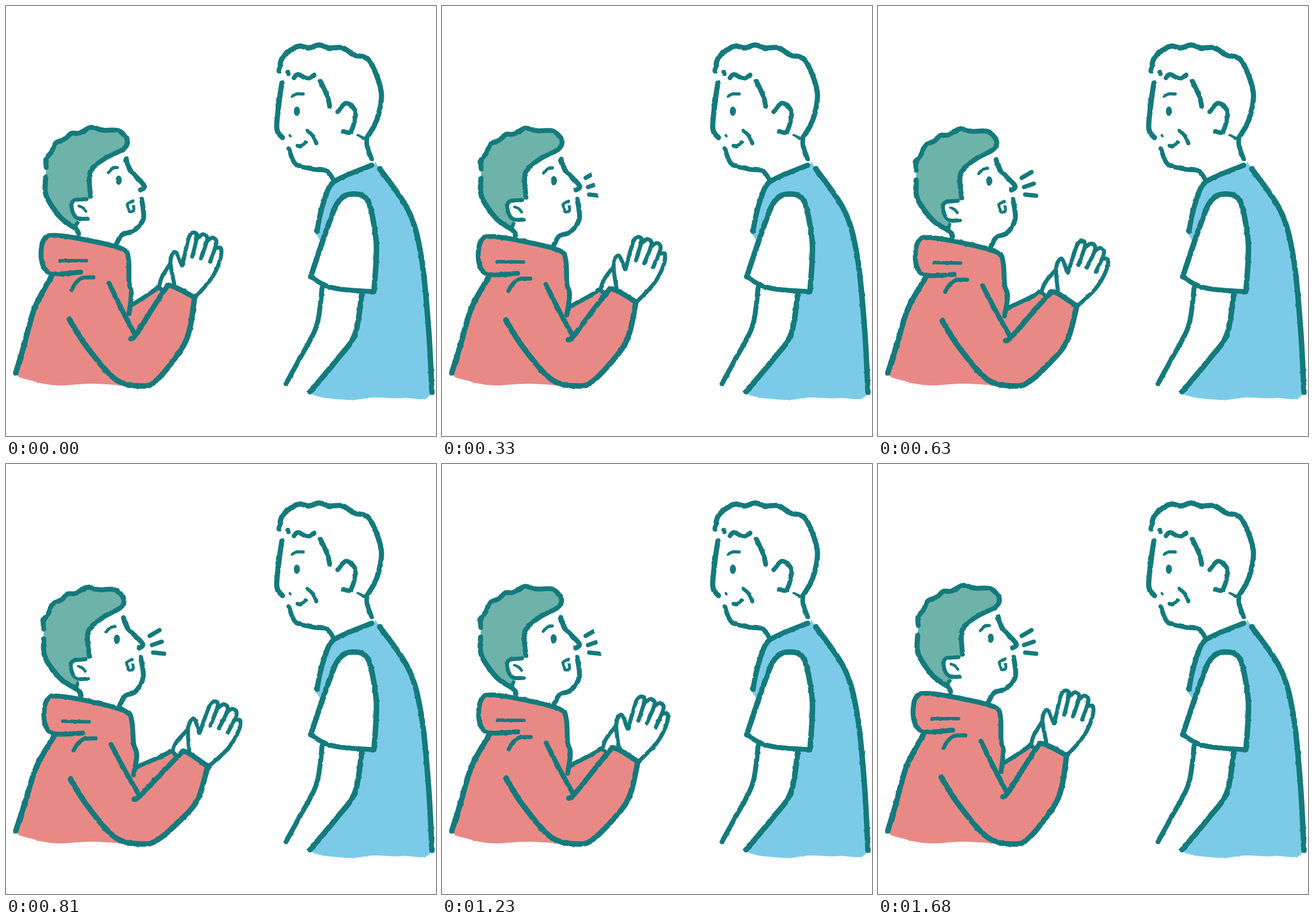
Recreate the animation shown at these times as an HTML page. Size 748 by 748 pixels, loop 1710 ms.

```html
<!DOCTYPE html>
<html lang="en">
<head>
<meta charset="utf-8">
<title>Request</title>
<style>
  html, body { margin: 0; width: 100%; height: 100%; overflow: hidden; background: #fff; }
  svg { display: block; width: 100vw; height: 100vh; }
  .ink { fill: none; stroke: #147a7c; stroke-linecap: round; stroke-linejoin: round; }
</style>
</head>
<body>
<svg viewBox="0 0 748 748">
  <defs>
    <filter id="rough" filterUnits="userSpaceOnUse" x="0" y="0" width="748" height="748" color-interpolation-filters="sRGB">
      <feTurbulence type="fractalNoise" baseFrequency="0.12" numOctaves="1" seed="4"/>
      <feDisplacementMap in="SourceGraphic" scale="3" xChannelSelector="R" yChannelSelector="G"/>
    </filter>
    <clipPath id="reveal"><polygon id="edge"/></clipPath>
  </defs>
  <g id="man" filter="url(#rough)"><g class="paint"></g><g class="ink"></g></g>
  <g id="boy" filter="url(#rough)"><g class="paint"></g><g class="ink"></g></g>
  <g id="voice" clip-path="url(#reveal)"><g class="ink"></g></g>
</svg>
<script>
const LOOP = 1710, STEP = 30, HALF = 840, VOICE = 855;
const HAIR = '#6db3a9', RED = '#e98986', BLUE = '#7bcbe8', TEAL = '#147a7c';
const $ = id => document.getElementById(id);
const clamp = v => Math.max(0, Math.min(1, v));
const P = s => s.split(' ').map(p => p.split(',').map(Number));
const back = pts => [...pts].reverse();
const moving = [];

// Smooth curve through the points
function curve(pts, closed) {
  const n = pts.length;
  const at = i => closed ? pts[(i + n) % n] : pts[Math.max(0, Math.min(n - 1, i))];
  const xy = (x, y) => x.toFixed(2) + ' ' + y.toFixed(2);
  let d = 'M' + xy(...pts[0]);
  for (let i = 0; i < (closed ? n : n - 1); i++) {
    const [a, b, c, e] = [at(i - 1), at(i), at(i + 1), at(i + 2)];
    d += 'C' + xy(b[0] + (c[0] - a[0]) / 6, b[1] + (c[1] - a[1]) / 6) +
         ' ' + xy(c[0] - (e[0] - b[0]) / 6, c[1] - (e[1] - b[1]) / 6) + ' ' + xy(...c);
  }
  return d + (closed ? 'Z' : '');
}

// Wavy hair: each span between two keys bulges outward
function scallop(keys, bulge) {
  return keys.flatMap(([x, y], i) => {
    if (!i) return [[x, y]];
    const [px, py] = keys[i - 1];
    return [[(x + px) / 2 + (y - py) * bulge, (y + py) / 2 - (x - px) * bulge], [x, y]];
  });
}

function add(who, layer, pts, closed) {
  const el = document.createElementNS('http://www.w3.org/2000/svg', 'path');
  el.setAttribute('d', curve(pts, closed));
  $(who).querySelector('.' + layer).append(el);
  if (who === 'boy') moving.push({ el, pts, closed });
  return el;
}

function line(who, width, pts) {
  if (typeof pts === 'string') pts = P(pts);
  add(who, 'ink', pts).setAttribute('stroke-width', width);
  return pts;
}

function fill(who, color, pts) {
  add(who, 'paint', pts, true).setAttribute('fill', color);
}

function eye(who, x, y) {
  const ring = Array.from({ length: 8 }, (_, i) => i * Math.PI / 4);
  fill(who, TEAL, ring.map(a => [x + 5.3 * Math.cos(a), y + 8 * Math.sin(a)]));
}

function drawMan() {
  const wave = scallop(P('475,113 496,76 527,73 562,73 605,85 637,103'), 0.15);
  line('man', 9, [...wave, ...P('653,152 645,198 628,229')]);
  line('man', 8, '628,230 628,243 636,266');
  line('man', 5, '612,225 627,232');
  line('man', 8, '490,115 491,118');
  line('man', 8, '501,125 508,119 524,126 536,120');
  line('man', 9, '480,134 476,160 471,212 481,229');
  line('man', 5, '494,225 495,226');
  line('man', 8, '492,248 504,275 535,284 558,287 570,303');
  line('man', 5.5, '497,157 505,153 517,153');
  eye('man', 506, 183);
  line('man', 6.5, '507,243 514,243 521,237');
  line('man', 6.5, '524,217 533,225 540,239');
  line('man', 8.5, '547,131 559,157 563,174');
  line('man', 8, '577,184 592,169 608,185 600,218 587,218');

  const shoulder = line('man', 9, '636,277 585,298 563,314 548,357 541,392');
  const spine = line('man', 9.5, '650,283 701,358 723,440 735,560 741,672');
  const sleeve = line('man', 9.5, '530,471 561,380 580,338 606,327 630,340 643,400 644,440 640,497');
  const cuff = line('man', 8.5, '640,497 585,493 555,486 530,471');
  line('man', 8.5, '550,490 540,557 510,615 487,657');
  const arm = line('man', 9.5, '619,500 607,571 575,616 529,671');
  fill('man', BLUE, [...shoulder, ...P('545,406 600,490'), ...arm, ...P('592,685 640,681 690,682'), ...back(spine), [643, 271]]);
  fill('man', '#fff', [...sleeve, ...cuff]);
}

function drawBoy() {
  const wave = scallop(P('70,281 79,254 103,231 128,221 169,216'), 0.18);
  const fringe = line('boy', 8.5, [...wave, ...P('196,217 211,234 204,249 174,264 150,283 145,300 147,331')]);
  const nape = line('boy', 9, '69,298 70,330 95,368 122,388 126,397');
  const ear = line('boy', 7, '140,336 117,339 115,355 124,369 142,370');
  line('boy', 6, '125,377 119,384');
  line('boy', 5, '127,348 134,351 139,357');
  fill('boy', HAIR, [...fringe, ...ear.slice(0, 4), [125, 377], ...back(nape.slice(0, 4))]);
  line('boy', 8.5, '209,266 216,285 240,312 234,320');
  line('boy', 5, '178,290 184,283 194,281');
  eye('boy', 196, 303);
  line('boy', 8.5, '236,336 239,370 222,391 202,398 191,416');
  line('boy', 5, '221,339 212,345 214,357 222,356 222,348');

  const hood = line('boy', 8.5, '130,463 78,465 62,443 65,408 85,399 150,409 203,423 213,440 214,480 218,500 214,535');
  const spine = line('boy', 9.5, '80,469 50,525 30,595 17,638');
  line('boy', 6, '94,443 140,443');
  line('boy', 7, '114,494 122,481 133,473 152,472');
  line('boy', 8.5, '179,482 205,535 224,571');
  const far = line('boy', 7.5, '216,522 255,497 264,489 273,496');
  const near = line('boy', 9, '217,579 227,570 274,497 288,487 328,507');
  const arm = line('boy', 9.5, '328,507 320,560 305,597 262,651 235,661 190,649 140,592 110,545');
  fill('boy', RED, [...hood.slice(1), ...far, ...near.slice(2), ...arm.slice(1, 5), ...P('150,657 90,660 45,652'), ...back(spine)]);

  line('boy', 7, '266,490 271,472 285,449');
  line('boy', 7, '293,485 286,445 294,428 306,451');
  line('boy', 7, '307,451 318,403 327,394 332,402 324,436');
  for (const i of [0, 1])
    line('boy', 7, P('333,404 343,397 350,406 339,439').map(([x, y]) => [x + i * 16, y + i * 6]));
  line('boy', 7, '365,421 374,422 372,443 358,473 331,505');
}

// Displacement of one point: body leans, arms reach, head tilts back
function warp([x, y], lean) {
  const lift = clamp((660 - y) / 110);
  const body = [0.0245 * (640 - y), (0.0245 * (x - 15) + 0.013 * (640 - y)) * lift];
  const arm = [0.13 * (690 - y), 0.13 * (x - 175) * lift];
  const head = [0.044 * (y - 378), 0.037 * (243 - x)];
  const tilt = x < 250 ? clamp((405 - y) / 30) : 0;
  const reach = clamp((x - 190 - Math.max(0, 520 - y) * 0.25) / 75) * (1 - tilt);
  const mix = i => tilt * head[i] + reach * arm[i] + (1 - tilt - reach) * body[i];
  return [x + lean * mix(0), y + lean * mix(1)];
}

function draw(t) {
  const lean = clamp(1 - Math.abs(t - HALF) / HALF);
  for (const { el, pts, closed } of moving)
    el.setAttribute('d', curve(pts.map(p => warp(p, lean)), closed));

  const age = t % VOICE - 150;
  const x = 246 + age * 0.109;
  $('voice').style.display = age > 0 ? '' : 'none';
  $('edge').setAttribute('points', `200,270 ${x - 12},270 ${x + 12},350 200,350`);
}

drawMan();
drawBoy();
for (const ray of ['250,299 267,289', '254,315 271,309', '256,328 275,330']) line('voice', 7.5, ray);

const start = performance.now();
let last = -1;
function tick() {
  const t = Math.floor((performance.now() - start) % LOOP / STEP) * STEP;
  if (t !== last) draw(last = t);
  requestAnimationFrame(tick);
}
tick();
</script>
</body>
</html>
```
